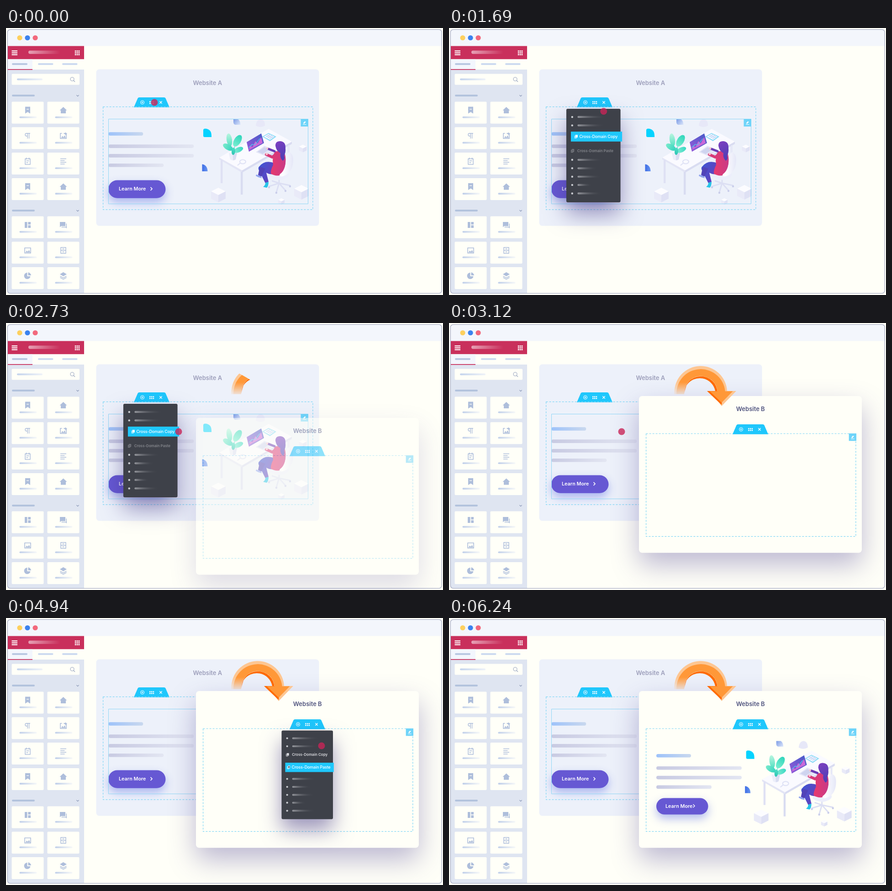
An HTML page with a canvas for the animation above (7280 ms loop, 957 by 585 pixels).

```html
<!DOCTYPE html>
<html lang="en">
<head>
<meta charset="utf-8">
<title>Cross-domain copy and paste</title>
<style>
html, body { margin: 0; width: 100%; height: 100%; overflow: hidden; background: #fffff8; }
canvas { display: block; }
</style>
</head>
<body>
<canvas id="stage" width="957" height="585"></canvas>
<script>
const W = 957, H = 585, STEP = 130, LOOP = 7280;
const CREAM = '#fffff8', CYAN = '#1fc7fc', RED = '#c9305c', ICON = '#aebedb';
const stage = document.getElementById('stage').getContext('2d');
const buffer = Object.assign(document.createElement('canvas'), { width: W, height: H }).getContext('2d');
let c = stage;

const clamp = v => Math.max(0, Math.min(1, v));
const easeOut = p => Math.sin(p * Math.PI / 2);
const mix = (a, b, p) => a + (b - a) * p;

// ---------- drawing helpers ----------
function box(x, y, w, h, r, fill) {
  c.beginPath();
  c.roundRect(x, y, w, h, r);
  c.fillStyle = fill;
  c.fill();
}
function dot(x, y, r, fill) {
  c.beginPath();
  c.arc(x, y, r, 0, Math.PI * 2);
  c.fillStyle = fill;
  c.fill();
}
function shape(d, fill) {
  c.fillStyle = fill;
  c.fill(new Path2D(d), 'evenodd');
}
function line(d, color, width = 1, cap = 'butt') {
  c.strokeStyle = color;
  c.lineWidth = width;
  c.lineCap = cap;
  c.lineJoin = 'round';
  c.stroke(new Path2D(d));
}
function fade(x0, y0, x1, y1, from, to) {
  const g = c.createLinearGradient(x0, y0, x1, y1);
  g.addColorStop(0, from);
  g.addColorStop(1, to);
  return g;
}
function bar(x, y, w, h, from, to = from) {
  box(x, y, w, h, h / 2, fade(x, 0, x + w, 0, from, to));
}
function text(str, x, y, size, weight, color, spacing = 0, align = 'left') {
  c.font = `${weight} ${size}px Inter, sans-serif`;
  c.letterSpacing = spacing + 'px';
  c.textAlign = align;
  c.fillStyle = color;
  c.fillText(str, x, y);
}
function shadow(color, y, blur, draw) {
  c.save();
  c.shadowColor = color;
  c.shadowOffsetY = y;
  c.shadowBlur = blur;
  draw();
  c.restore();
}
function at(x, y, draw, scale = 1) {
  c.save();
  c.translate(x, y);
  c.scale(scale, scale);
  draw();
  c.restore();
}
// Draws a group as one picture, then blends it in.
function layer(alpha, draw) {
  if (alpha <= 0) return;
  c = buffer;
  c.clearRect(0, 0, W, H);
  draw();
  c = stage;
  c.globalAlpha = alpha;
  c.drawImage(buffer.canvas, 0, 0);
  c.globalAlpha = 1;
}

// ---------- sidebar ----------
const icons = {
  bookmark() { shape('M-5.5-8H5.5V7L0 3.5L-5.5 7Z', ICON); line('M-2.5-2.5H2.5', CREAM, 1.3); },
  house() { shape('M0-7.5L8 0H5.5V6.5H-5.5V0H-8Z', ICON); },
  pilcrow() { line('M-.5-5.5V6M3-5.5V6M5.5-5.5H-2.5A3 3 0 0 0-2.5 .5H-.5', ICON, 1.4); },
  picture() {
    line('M-6.5-5.5H6.5V6H-6.5Z', ICON, 1.6);
    shape('M-5 4.5L-2 .5L.5 3L3-1L5.5 4.5Z', ICON);
  },
  sparkle() {
    icons.picture();
    line('M-3-5.5H1', CREAM, 2);
    line('M5-7.5V-1.5M2-4.5H8', ICON, 1.4);
  },
  calendar() { line('M-5.5-5.5H5.5V7H-5.5ZM-3-8V-4M3-8V-4M-3-1H3M-3 3H1', ICON, 1.5); },
  lines() { line('M-6.5-5.5H6.5M-6.5-1.7H3M-6.5 2.2H6.5M-6.5 6H3', ICON, 1.5); },
  blocks() { shape('M-6.5-6.5H-1V6.5H-6.5ZM.8-6.5H6.5V-1H.8ZM.8 .8H6.5V6.5H.8Z', ICON); },
  chat() { shape('M-7.5-6.5H4.5V2.5H-5L-7.5 5ZM6-3H7.5V7.5L5 5.5H-4V4H6Z', ICON); },
  drawer() { line('M-5.5-6.5H5.5V6.5H-5.5ZM-5.5 0H5.5M-2-3.2H2M-2 3.2H2', ICON, 1.5); },
  pie() { shape('M-1-7A7 7 0 1 0 6 1H-1ZM1-7.5A7 7 0 0 1 7.5-1H1Z', ICON); },
  layers() {
    shape('M0-8L7.5-3.5L0 1L-7.5-3.5Z', ICON);
    line('M-7 .5L0 4.5L7 .5M-7 3.5L0 7.5L7 3.5', ICON, 1.4);
  }
};
const groups = [
  [148, 161.5, ['bookmark', 'house', 'pilcrow', 'sparkle', 'calendar', 'lines', 'bookmark', 'house']],
  [400, 412.5, ['blocks', 'chat', 'picture', 'drawer', 'pie', 'layers']]
];

function sidebar() {
  box(4, 91, 167, 490, 0, '#dfe5f1');
  box(4, 39.5, 167, 29, 0, RED);
  for (let i = 0; i < 3; i++) box(12.5, 49.2 + i * 4.1, 12.5, 2.2, 0, '#fff');
  bar(49, 49.5, 70, 7.2, 'rgba(255,255,255,.55)', 'rgba(255,255,255,0)');
  for (let i = 0; i < 9; i++) box(150.8 + i % 3 * 3.9, 49.2 + Math.floor(i / 3) * 3.9, 2.7, 2.7, 0, '#fff');

  box(4, 68.5, 167, 22.5, 0, CREAM);
  box(4, 68.5, 54, 22, 0, '#f3f6fd');
  box(4, 90, 54, 1.8, 0, RED);
  bar(13, 77, 34, 4, '#b9c8e2');
  bar(70, 77, 33.5, 4, '#ccdaf0');
  bar(123, 77, 33.5, 4, '#ccdaf0');

  box(12.5, 100.5, 148.5, 24, 2, CREAM);
  bar(24, 110.5, 56, 4, '#c3d3ec', '#eef2f8');
  line('M149 112A4 4 0 1 1 141 112A4 4 0 1 1 149 112M148 115L151 118', '#99a5c0', 1.1);

  for (const [head, top, names] of groups) {
    bar(13, head - 2, 50, 4, '#b3c3dd');
    line(`M154.3 ${head - 1.2}L157 ${head + 1.5}L159.7 ${head - 1.2}`, '#8f9cba', 1.2);
    names.forEach((name, i) => {
      const x = 12.5 + i % 2 * 78, y = top + Math.floor(i / 2) * 55.8;
      box(x, y, 70, 48, 2, CREAM);
      bar(x + 17, y + 32.2, 38, 3.8, '#c0cfe9', '#f6f8f8');
      at(x + 35, y + 19, icons[name]);
    });
  }
}

function browser() {
  c.fillStyle = CREAM;
  c.fillRect(0, 0, W, H);
  box(3.5, 3.5, 950.5, 36, [6, 6, 0, 0], '#f3f6fc');
  ['#fdd05f', '#3b82ee', '#f2697d'].forEach((color, i) => dot(30 + i * 17, 21.5, 5.6, color));
  sidebar();
  c.beginPath();
  c.roundRect(3.3, 3.3, 950.9, 578, 6);
  c.strokeStyle = '#a9aec6';
  c.lineWidth = 1.3;
  c.stroke();
}

// ---------- site panels ----------
function handle(cx, top) {
  at(cx, top, () => {
    shape('M-27 0H27Q29.5 0 30.5 2L39 21.8H-39L-30.5 2Q-29.5 0-27 0Z', CYAN);
    line('M-16.4 11A4 4 0 1 1-24.4 11A4 4 0 1 1-16.4 11M-22.5 11H-18.3M-20.4 8.9V13.1', '#fff', 1);
    for (let i = 0; i < 6; i++) box(-4.9 + i % 3 * 3.8, 8.2 + Math.floor(i / 3) * 3.7, 2.5, 2.5, .5, '#fff');
    line('M17.3 8.3L22.7 13.7M22.7 8.3L17.3 13.7', '#fff', 1.3);
  });
}
function dashes(x, y) {
  c.setLineDash([4, 3]);
  line(`M${x} ${y}h459.3v225.2h-459.3Z`, '#7fd6f5', 1.2);
  c.setLineDash([]);
}
function pencil(x, y) {
  box(x, y, 16.4, 16.4, 0, '#6fd4f9');
  at(x, y, () => {
    line('M6.2 9.7L10.2 5.7', '#fff', 2.6);
    line('M4.5 12H12', '#fff', 1);
  });
}

function cube(x, y, s) {
  const a = s * .5;
  at(x, y, () => {
    shape(`M0 ${-s}L${s} ${-a}L0 0L${-s} ${-a}Z`, '#fcfcff');
    shape(`M${-s} ${-a}L0 0V${s}L${-s} ${a}Z`, '#e9eaf8');
    shape(`M${s} ${-a}L0 0V${s}L${s} ${a}Z`, '#dfe1f4');
  });
}
function leaf(x, y, rx, ry, angle, from, to) {
  at(x, y, () => {
    c.rotate(angle);
    c.beginPath();
    c.ellipse(0, 0, rx, ry, 0, 0, Math.PI * 2);
    c.fillStyle = fade(0, -ry, 0, ry, from, to);
    c.fill();
  });
}

function desk() {
  shape('M467 284L575 221L626 249L517 312Z', '#fafaff');
  shape('M467 284L517 312V317L467 288Z', '#e3e5f5');
  shape('M517 312L626 249V254L517 317Z', '#d9dcf1');
  shape('M470 289H474.5V340H470Z', '#dfe1f4');
  shape('M514 315H518.5V365H514Z', '#d9dcf1');
  shape('M617 257H621V292H617Z', '#e6e8f7');
  line('M525 293A6.5 4.5 0 1 1 512 293A6.5 4.5 0 1 1 525 293M513 296L507 301', '#dfe2f5', 2.2);
}
function plant() {
  shape('M488 274H506L503 288Q497 292 491 288Z', '#eceefa');
  shape('M497 274H506L503 288Q500 290 497 290Z', '#d9ddf2');
  line('M497 278Q499 262 505 248M497 278Q495 264 488 244', '#49cfc0', 1);
  leaf(489, 245, 6, 14, -.15, '#b8f5df', '#55e0c2');
  leaf(507, 247, 7.5, 14, .55, '#2fd5bb', '#7aeed0');
  leaf(486, 261, 6, 12, -1.05, '#7beacc', '#33d3be');
  leaf(509, 267, 5.5, 11, 1.15, '#38d8c2', '#83ecd4');
  leaf(498, 270, 4, 8, .1, '#51dfc6', '#2cc4b4');
}
function laptop() {
  shape('M547 272L566 258L590 268L569 281Z', '#e4e6f7');
  shape('M551 271L566 261L577 266L562 276Z', '#cfd4ef');
  shape('M527 250L559 231L565 252L532 271Z', fade(530, 266, 562, 235, '#8f5ad8', '#4b5bc9'));
  shape('M532 267L535 259L540 261L546 248L551 253L559 239L562 252Z', '#c969d8');
  line('M532 262L539 255L545 256L556 242', '#4ad9f0', 1.2);
  shape('M561 238L575 230L592 238L578 248Z', '#8fdcf7');
  shape('M564 238L575 232L588 238L578 245Z', '#f4f8ff');
  line('M570 238L578 234M573 240L582 236M577 242L585 238', '#8aa6ea', .9);
}
function chairBase() {
  line('M598 328V340L576 347M598 340L622 345M598 340L592 360M598 340L612 356M598 340L583 335',
    '#dcdff3', 3, 'round');
  for (const [x, y] of [[576, 349], [622, 347], [592, 361], [612, 357]]) dot(x, y, 2.2, '#c9cdea');
}
function worker() {
  chairBase();
  shape('M578 322Q598 314 619 319Q622 328 602 333Q586 333 578 326Z', '#eceefb');
  shape('M588 296Q567 288 555 303Q550 306 556 316L568 340L575 337L570 317Q582 324 600 317Z',
    fade(553, 300, 596, 320, '#3e56d4', '#6e3cb5'));
  shape('M556 304L552 322L559 326L568 308Z', '#5143b8');
  shape('M548 321L559 325L560 329Q553 328 547 324Z', '#8fa3ee');
  shape('M568 339L575 337Q575 346 571 350L563 348Q568 345 568 339Z', '#28c4e8');
  shape('M589 271Q603 267 611 277Q616 298 605 322Q590 326 580 319Q579 312 585 300Q582 281 589 271Z',
    fade(585, 0, 612, 0, '#e23a72', '#c93a86'));
  line('M591 277L583 283L570 277', '#d83a78', 6, 'round');
  line('M588 270L575 265', '#6a3cb4', 5, 'round');
  dot(571, 276, 2.5, '#f8c4cc');
  dot(572, 264, 2.3, '#f8c4cc');
  shape('M590 258Q590 247 601 248Q613 249 612 264Q613 272 609 280Q612 287 606 291Q599 284 601 274Q592 270 590 258Z',
    fade(590, 250, 612, 288, '#7c3fc0', '#4b3fb4'));
  shape('M620 272Q632 276 628 300Q624 320 606 325Q596 326 600 320Q612 312 613 288Q614 274 620 272Z',
    fade(606, 0, 630, 0, '#fdfdff', '#e4e6f7'));
}
function artwork() {
  shape('M436 220.5Q450 221 450 236V239H435Q432 239 432 236V224Q432 220.5 436 220.5Z', '#05d3ff');
  shape('M429.5 298.5Q441 300 441.5 314H429.5Z', fade(430, 0, 442, 0, '#3f6fe6', '#6a97f0'));
  shape('M498 199.8H508Q513 203 513.5 212H502Q498 211 498 206Z', fade(498, 200, 513, 212, '#7f9ee6', '#dbe5fa'));
  shape('M547 214Q549 199.8 558 199.8Q567 201 567 214Q557 220 547 214Z', '#e7e8f8');
  cube(465, 366, 16);
  cube(647, 360, 16);
  cube(650, 264, 8.5);
  cube(603, 380, 7);
  desk();
  plant();
  laptop();
  worker();
}

function copyBars() {
  bar(0, 0, 76, 7.5, '#9dc2fa', '#c9d8ee');
  [187, 187, 121].forEach((w, i) => bar(0, 27 + i * 20.8, w, 7.6, '#c8cae2', '#e3e6f2'));
}
function button(x, y, w, h, pad) {
  shadow('rgba(84,104,226,.45)', 9, 20, () => box(x, y, w, h, h / 2, '#6658d3'));
  const mid = y + h / 2 - 1;
  text('Learn More', x + pad, mid + 4, 10.8, 600, '#fff');
  line(`M${x + w - 33} ${mid - 3.3}l3.6 3.5l-3.6 3.5`, '#fff', 1.5);
}

function siteA() {
  box(197.5, 90.5, 488, 343, 7, '#edf1fa');
  text('Website A', 441.3, 125, 13, 600, '#9d9fbb', 0, 'center');
  handle(319, 152);
  dashes(212.6, 172.7);
  at(224.3, 228.3, copyBars);
  artwork();
  button(224, 333.5, 125.5, 39.3, 23);
  line('M224.5 199.5H661.5V385.3H224.5Z', '#8fd6f6', 1);
  pencil(645.5, 199.4);
}
function siteB() {
  shadow('rgba(70,58,140,.36)', 26, 58, () => box(416, 160, 488, 343.5, 7, CREAM));
  text('Website B', 660.2, 192.5, 13, 600, '#50547f', 0, 'center');
  dashes(431.6, 242.5);
  handle(660, 222);
  pencil(875.7, 241.9);
}
function pasted() {
  at(454, 298, copyBars);
  at(218.7, 69.7, artwork);
  button(454, 394.5, 113.5, 36, 20);
}

// ---------- context menu ----------
const rows = [[17, 60], [34.5, 58], [106, 53], [123.5, 41], [141, 50], [158.2, 30], [175.8, 52]];
const menuA = { x: 316.2, y: 177, base: 1.055, copy: 57.6, paste: 87.2, pick: 'Copy', indent: 5, dim: '#85878d' };
const menuB = { x: 659.7, y: 246.5, base: 1, copy: 53, paste: 80.6, pick: 'Paste', indent: 0, dim: '#d8d9dd' };

function pages(x, y, color, fill) {
  box(x - 1.4, y - 3.5, 4.8, 5.6, .6, color);
  line(`M${x - 2.6} ${y - 2}v5.3h4.2`, color, 1);
  if (!fill) box(x - .5, y - 2.6, 3, 3.8, 0, '#5b5e66');
}
function menu(m, scale) {
  at(m.x, m.y, () => {
    shadow('rgba(62,50,130,.5)', 24 * scale, 44 * scale, () => box(-56.2, 0, 112.5, 194.3, 3, '#3e4149'));
    for (const [y, w] of rows) {
      dot(-44, y, 2.1, '#c9cbd0');
      bar(-33, y - 2, w, 4, '#94969c', 'rgba(62,65,73,0)');
    }
    for (const name of ['Copy', 'Paste']) {
      const y = name === 'Copy' ? m.copy : m.paste, label = 'Cross-Domain ' + name;
      if (name === m.pick) {
        box(-48.2 + m.indent * .3, y - 10.2, 106.3, 20.6, 0, CYAN);
        pages(-41 + m.indent, y, '#fff', name === 'Copy');
        text(label, -34.2 + m.indent, y + 3.2, 9 / m.base, 500, '#fff', -.17);
      } else {
        pages(-43.4, y, m.dim, name === 'Copy');
        text(label, -33.5, y + 2.9, 8 / m.base, 600, m.dim);
      }
    }
  }, scale);
}

// ---------- arrow ----------
function arrow(p) {
  c.save();
  if (p < 1) {
    // wheel wipe that starts at the bottom and turns clockwise
    c.beginPath();
    c.moveTo(561, 139.5);
    c.arc(561, 139.5, 120, Math.PI / 2, Math.PI / 2 + Math.PI * 2 * p ** 1.585);
    c.clip();
  }
  shape('M493.5 156V154A57.7 57.7 0 0 1 609 150H590A38.5 38.5 0 0 0 513 156Z', '#fdc692');
  shape('M515 154.5A36.5 36.5 0 0 1 588 152L583 149A34.5 34.5 0 0 0 520 137Z', '#ff6a00');
  shape('M572 149H629L597 182Z', '#fdc692');
  shape('M565 149H600L597 179.5Z', '#ff6a00');
  shape('M498 156V154.5A53.5 53.5 0 0 1 604.8 150H588A36.6 36.6 0 0 0 515 156Z', '#ff9838');
  shape('M571 149.5H621.5L597 174.5Z', '#ff9838');
  c.globalCompositeOperation = 'destination-out';
  c.fillStyle = fade(0, 130, 0, 157, 'rgba(0,0,0,0)', 'rgba(0,0,0,.85)');
  c.fillRect(490, 130, 32, 30);
  c.restore();
}

// ---------- timeline ----------
const stops = [[325, 163], [378, 238], [665, 233], [717, 327]];
const moves = [12, 24, 36];

function cursor(k, alpha) {
  let [x, y] = stops[0];
  moves.forEach((start, i) => {
    const p = easeOut(clamp((k - start) / 6));
    x = mix(x, stops[i + 1][0], p);
    y = mix(y, stops[i + 1][1], p);
  });
  c.globalAlpha = alpha;
  dot(x, y, 7.5, 'rgba(200,36,88,.8)');
  c.globalAlpha = 1;
}

function draw(k) {
  const part = start => clamp((k - start) / 6);
  const openA = part(0), swap = part(18), openB = part(30), done = part(42);
  const late = p => clamp(2 - 2 * p);
  const swell = mix(1, menuA.base, clamp((k - 6) / 2));

  browser();
  siteA();
  layer(openA * late(swap), () => menu(menuA, mix(.5, 1, openA) * swell));
  layer(swap, () => at(0, 96 * (1 - swap), siteB));
  layer(swap > 0 ? 1 : 0, () => arrow(swap));
  layer(done, pasted);
  layer(openB * late(done), () => menu(menuB, mix(.5, 1, openB)));
  cursor(k, late(done));
}

let shown = -1;
const begin = performance.now();
function tick() {
  const k = Math.floor((performance.now() - begin) % LOOP / STEP);
  if (k !== shown) draw(shown = k);
  requestAnimationFrame(tick);
}
tick();
</script>
</body>
</html>
```
